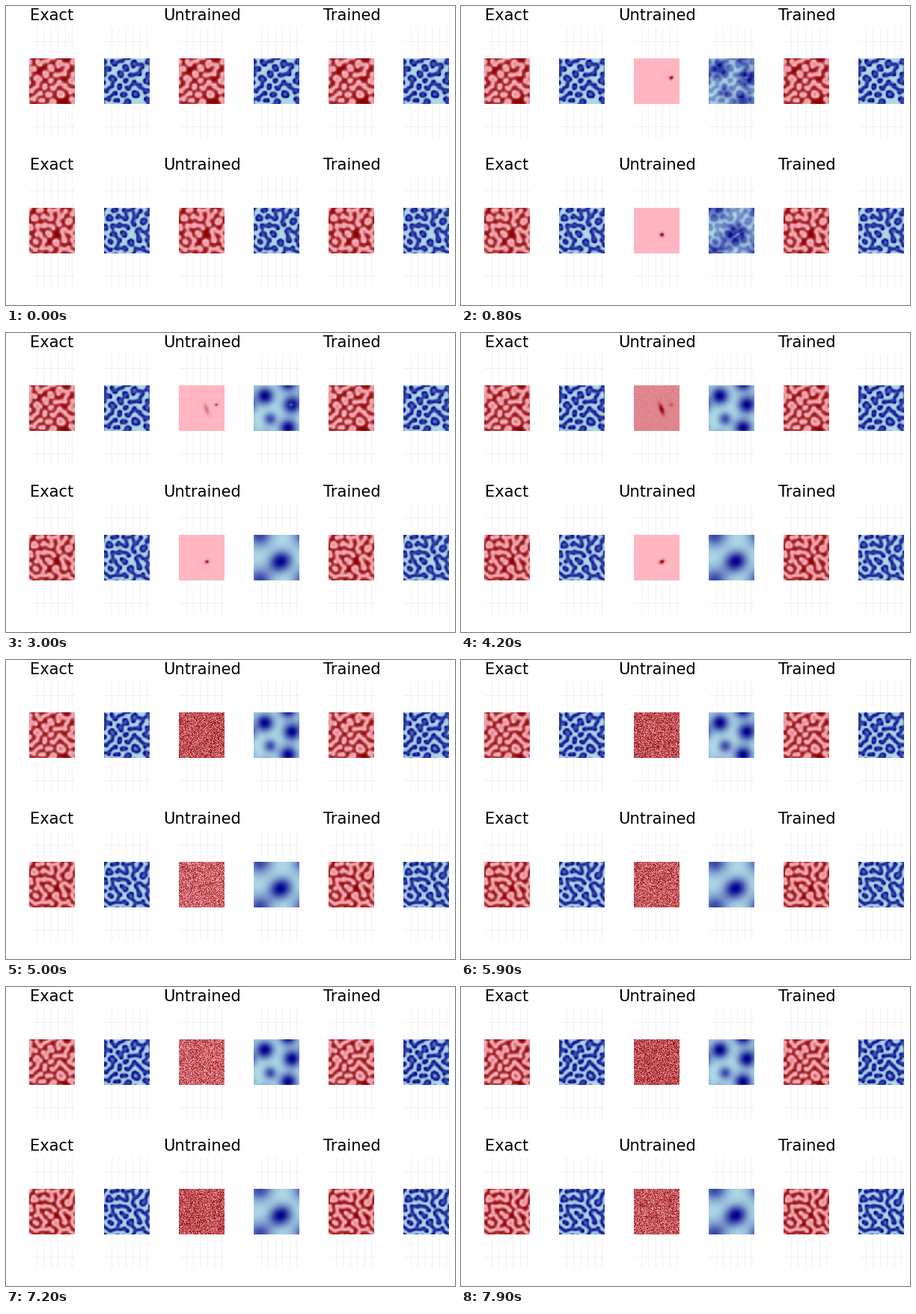
Animation, 600 px wide and 400 px high, one loop 8 s. Source, as a matplotlib script:

```python
import numpy as np
import matplotlib.pyplot as plt
from matplotlib.animation import FuncAnimation
from matplotlib.colors import LinearSegmentedColormap

WIDTH, HEIGHT, DPI = 600, 400, 100
FRAMES, INTERVAL = 80, 100
N, SIDE = 80, 61              # grid cells and panel side in pixels
STEPS_PER_FRAME, WARM_UP = 4, 300
FEED, KILL, DIFF_U, DIFF_V = 0.055, 0.062, 0.16, 0.08

REDS = LinearSegmentedColormap.from_list("reds", ["lightpink", "darkred"])
BLUES = LinearSegmentedColormap.from_list("blues", ["lightblue", "darkblue"])

X, Y = np.meshgrid(*[(np.arange(N) + 0.5) * SIDE / N] * 2)


def ramp(i, start, stop):
    return float(np.clip((i - start) / (stop - start), 0, 1))


def normalise(field):
    low, high = field.min(), field.max()
    return (field - low) / (high - low)


def wrap(d):
    return (d + SIDE / 2) % SIDE - SIDE / 2


def bump(x, y, sx, sy=None, tilt=0.0):
    """Gaussian on the periodic panel, in panel pixels."""
    dx, dy = wrap(X - x), wrap(Y - y)
    along = dx * np.cos(tilt) + dy * np.sin(tilt)
    across = dy * np.cos(tilt) - dx * np.sin(tilt)
    return np.exp(-0.5 * ((along / sx) ** 2 + (across / (sy or sx)) ** 2))


def blur(field, sigma):
    k = np.fft.fftfreq(N)
    decay = np.exp(-2 * (np.pi * sigma) ** 2 * (k[:, None] ** 2 + k ** 2))
    return np.fft.ifft2(np.fft.fft2(field) * decay).real


def laplacian(f):
    return sum(np.roll(f, s, axis) for s in (-1, 1) for axis in (0, 1)) - 4 * f


def scatter_seeds(rng, gaps, spacing=8.5, tries=1500):
    """Random points that keep apart and stay out of the gaps."""
    seeds = []
    for x, y in rng.uniform(0, SIDE, (tries, 2)):
        in_gap = gaps[int(y * N / SIDE), int(x * N / SIDE)] > 0.6
        if not in_gap and all(np.hypot(wrap(x - a), wrap(y - b)) > spacing
                              for a, b in seeds):
            seeds.append((x, y))
    return seeds


def gray_scott(gaps, seed):
    """Normalised (u, v) fields for every frame."""
    rng = np.random.default_rng(seed)
    spots = np.max([bump(x, y, *rng.uniform(1.5, 2.6, 2), rng.uniform(0, np.pi))
                    for x, y in scatter_seeds(rng, gaps)], axis=0)
    u, v = 1 - 0.6 * spots, 0.45 * spots
    history = []
    for step in range(WARM_UP + STEPS_PER_FRAME * FRAMES):
        if step >= WARM_UP and (step - WARM_UP) % STEPS_PER_FRAME == 0:
            history.append((normalise(u), normalise(v)))
        reaction = u * v * v
        u = u + DIFF_U * laplacian(u) - reaction + FEED * (1 - u)
        v = v + DIFF_V * laplacian(v) + reaction - (FEED + KILL) * v
    return history


class Row:
    """One initial state: its true evolution and the untrained model's."""

    def __init__(self, seed, blobs, peak, late_spot, spike, noise_span):
        self.seed, self.peak, self.noise_span = seed, peak, noise_span
        self.late = normalise(sum(weight * bump(x, y, size)
                                  for x, y, size, weight in blobs))
        self.late_spot = late_spot
        self.spike, self.spike_strength, self.spike_end = spike
        self.exact = gray_scott(self.late, seed)

    def wild_red(self, i):
        """Runaway growth at one peak, then drowned by grid noise."""
        growth = 40 * ramp(i, 0, 18)
        spot = normalise(self.exact[0][0]
                         * np.exp(growth * (bump(*self.peak, 8) - 1)))
        settle = ramp(i, 24, 40)
        spot = (1 - settle) * spot + settle * self.late_spot
        w = ramp(i, *self.noise_span)
        rng = np.random.default_rng(1000 * self.seed + i)
        mean = rng.uniform(0.4, 0.58)
        noise = 0.85 * (rng.random((N, N)) - 0.5)
        level = w * (0.65 * (1 - w) + mean * w)
        return np.clip((1 - w ** 2) * spot + level + w ** 3 * noise, 0, 1)

    def wild_blue(self, i):
        """Pattern diffusing into soft blobs, with a passing negative spike."""
        memory = np.exp(-i / 8)
        field = memory * blur(self.exact[0][1], 0.15 * i) + (1 - memory) * self.late
        strength = ramp(i, 7, 15) * (1 - ramp(i, 18, self.spike_end))
        return normalise(field - self.spike_strength * strength * self.spike)

    def fields(self, i):
        pair = self.exact[i]
        return [*pair, self.wild_red(i), self.wild_blue(i), *pair]


rows = [
    Row(seed=4, peak=(50, 26), noise_span=(37, 47),
        blobs=[(15, 14, 8, 1), (51, 26, 8, 1), (46, 57, 8, 1), (22, 45, 6, 0.65)],
        late_spot=bump(37, 32, 2, 5, -0.35) + 0.3 * bump(50, 26, 2),
        spike=(bump(50, 26, 1.3, 2.6) + bump(50, 26, 2.6, 1), 0.9, 34)),
    Row(seed=9, peak=(37.5, 36), noise_span=(43, 49),
        blobs=[(39, 34, 9, 1), (30, 39, 9, 0.6), (8, 0, 11, 0.95)],
        late_spot=bump(37.5, 36, 2.6, 1.9, -0.5),
        spike=(bump(38, 36, 4.5, 1, -0.6), 3, 23)),
]

fig = plt.figure(figsize=(WIDTH / DPI, HEIGHT / DPI), dpi=DPI, facecolor="white")
ax = fig.add_axes([0, 0, 1, 1])
ax.axis("off")

GRID = dict(color="black", alpha=0.08, lw=0.5, zorder=1)
images = []
for row in range(len(rows)):
    y = 200 * row
    for column in range(6):
        x = 31 + 100 * column
        ax.vlines(x + SIDE * 20 / 128 * np.arange(1, 7), y + 27, y + 176, **GRID)
        ax.hlines([y + 46.5, y + 160.5], x, x + SIDE, **GRID)
        images.append(ax.imshow(
            np.zeros((N, N)), cmap=BLUES if column % 2 else REDS, vmin=0, vmax=1,
            extent=(x, x + SIDE, y + 70 + SIDE, y + 70),
            interpolation="nearest", aspect="auto", zorder=2))
    for x, title in zip((61.5, 262, 462.5), ("Exact", "Untrained", "Trained")):
        ax.text(x, y + 19, title, ha="center", va="baseline",
                family="DejaVu Sans", fontsize=21 * 72 / DPI, color="black")

ax.set_xlim(0, WIDTH)
ax.set_ylim(HEIGHT, 0)


def update(i):
    fields = [field for row in rows for field in row.fields(i)]
    for image, field in zip(images, fields):
        image.set_data(field)
    return images


animation = FuncAnimation(fig, update, frames=FRAMES, interval=INTERVAL,
                          repeat=True, blit=False)
plt.show()
```
